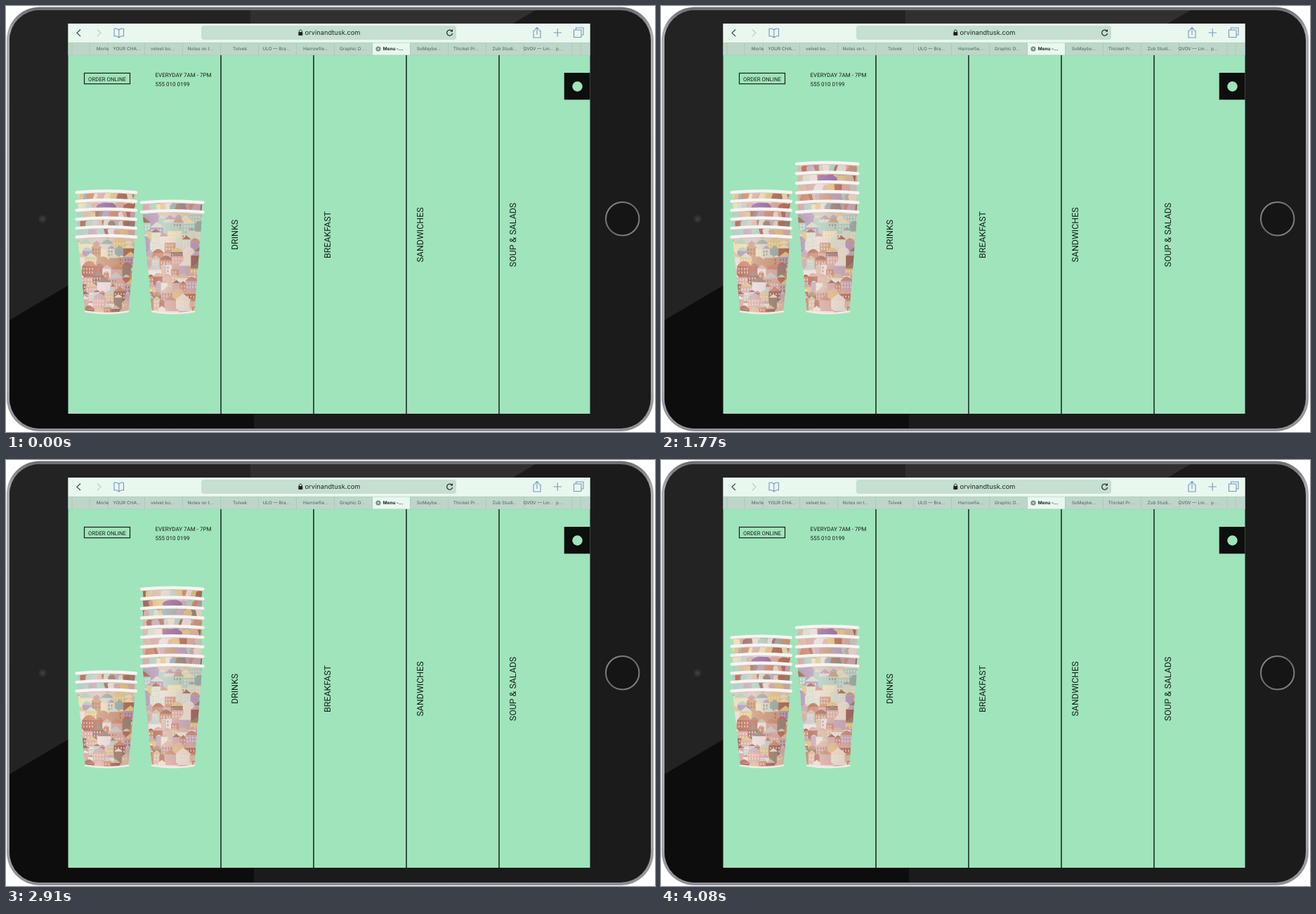
An HTML page for the animation above (4110 ms loop, 924 by 606 pixels).

```html
<!DOCTYPE html>
<html lang="en">
<head>
<meta charset="utf-8">
<title>Cup stacks</title>
<style>
html, body { margin: 0; width: 100%; height: 100%; overflow: hidden; background: #fff; }
svg { display: block; width: 924px; height: 606px; }
text { text-rendering: geometricPrecision; }
.ui { font-family: Inter, "Open Sans", sans-serif; }
.tab { font-size: 6.4px; font-weight: 500; fill: #5f7068; text-anchor: middle; }
.menu { font-family: Roboto, "Liberation Sans", sans-serif; fill: #14201a; }
.icon { fill: none; stroke: #7895bd; stroke-width: 1.1; }
</style>
</head>
<body>
<svg viewBox="0 0 924 606" xmlns="http://www.w3.org/2000/svg">
  <defs>
    <clipPath id="face"><rect x="5" y="6" width="913" height="595" rx="43"/></clipPath>
    <linearGradient id="edge" x2="0" y2="1">
      <stop offset="0" stop-color="#6a6b6e"/><stop offset=".06" stop-color="#a9aaad"/>
      <stop offset=".9" stop-color="#a3a4a8"/><stop offset="1" stop-color="#8d8c92"/>
    </linearGradient>
    <linearGradient id="ring" x2="1" y2="1">
      <stop offset="0" stop-color="#8f9092"/><stop offset=".5" stop-color="#68696b"/><stop offset="1" stop-color="#8a8b8d"/>
    </linearGradient>
    <linearGradient id="shade">
      <stop offset="0" stop-color="#f3e6df" stop-opacity=".12"/><stop offset=".35" stop-color="#f3e6df" stop-opacity=".34"/>
      <stop offset="1" stop-color="#b08878" stop-opacity=".2"/>
    </linearGradient>
  </defs>

  <g id="tablet">
    <rect x="1" y="1.500" width="921" height="603.500" rx="47" fill="url(#edge)"/>
    <g clip-path="url(#face)">
      <rect width="924" height="606" fill="#1b1b1c"/>
      <path d="M0 0H348V244L0 450Z" fill="#232324"/>
      <path d="M348 0H764L348 244Z" fill="#303031"/>
      <path d="M0 450L348 244V580H353V606H0Z" fill="#0d0d0e"/>
    </g>
    <circle cx="52" cy="303" r="5.500" fill="#303032"/>
    <circle cx="52" cy="303" r="2.500" fill="#3d3d42"/>
    <circle cx="877.700" cy="302.800" r="23.700" fill="#151516" stroke="url(#ring)" stroke-width="2"/>
  </g>

  <rect x="88.500" y="25" width="743" height="555" fill="#a0e4bb"/>
  <g id="browser" class="ui">
    <rect x="88.500" y="25" width="743" height="27" fill="#e8f8ef"/>
    <rect x="278" y="28" width="363" height="20" rx="4" fill="#c5dfd0"/>
    <rect x="88.500" y="52" width="743" height="18" fill="#bcd7c8"/>
    <rect x="521.500" y="52" width="54" height="18" fill="#e8f8ef"/>
    <path d="M106 33.500L101 38.300L106 43" class="icon" style="stroke:#46525a;stroke-width:1.3"/>
    <path d="M130 33.500L135 38.300L130 43" class="icon" style="stroke:#b9cbc4"/>
    <path d="M160.800 34Q157 31 154 32.500V43Q158 42 160.800 45Q164 42 167.500 43V32.500Q164 31 160.800 34V45" class="icon"/>
    <path d="M753.500 35H751V45H761V35H758.500M756 41V31M753 33.500L756 30.500L759 33.500" class="icon"/>
    <path d="M779.500 38H791M785.200 32.300V43.700" class="icon"/>
    <path d="M811.500 34V31H822V41H819M808.500 34H819V44.500H808.500Z" class="icon"/>
    <rect x="416.300" y="37" width="6" height="5" rx=".7" fill="#222"/>
    <path d="M417.400 37V35.500Q419.300 32.300 421.200 35.500V37" fill="none" stroke="#222"/>
    <text x="465" y="41.400" font-size="9.300" text-anchor="middle" fill="#1d2922">orvinandtusk.com</text>
    <path d="M634.800 35.600A4 4 0 1 0 635.600 39" fill="none" stroke="#222" stroke-width="1.200"/>
    <path d="M632.500 36.400H636V33Z" fill="#222"/>
    <g id="tabs"></g>
    <circle cx="530" cy="61" r="3.600" fill="#7d8c85"/>
    <path d="M528.600 59.600L531.400 62.400M531.400 59.600L528.600 62.400" stroke="#e8f8ef" stroke-width=".8"/>
  </g>

  <g id="menu" class="menu"></g>
  <g class="menu" font-size="8">
    <rect x="111.500" y="95.500" width="65" height="15.200" fill="none" stroke="#14201a" stroke-width="1.200"/>
    <text x="117" y="106.700" font-size="7.850">ORDER ONLINE</text>
    <text x="212.500" y="101">EVERYDAY 7AM - 7PM</text>
    <text x="212.500" y="114.200">555 010 0199</text>
  </g>
  <rect x="794.700" y="95" width="36.800" height="38.300" fill="#0c0f0d"/>
  <circle cx="813.500" cy="114.500" r="7.200" fill="#a0e4bb"/>
  <g id="stacks"></g>
</svg>
<script>
const LOOP = 4110;
const $ = id => document.getElementById(id);

// Labels with the x of their centre
const tabs = [
  ["Morle", 137.5], ["YOUR CHA...", 172], ["velvet bo...", 223], ["Notes on t...", 277], ["Tolvek", 333],
  ["ULO — Bra...", 385], ["Harrowfie...", 441], ["Graphic D...", 493], ["Menu -...", 551], ["SoMaybe...", 602],
  ["Thicket Pr...", 655], ["Zub Studi...", 710], ["QVOV — Lm...", 758], ["p...", 788]
];
const dividers = [94, 119, 145.5, 806, 818];
for (let x = 197.5; x < 740; x += 54) dividers.push(x);
$("tabs").innerHTML =
  `<path d="${dividers.map(x => `M${x} 53V69`).join("")}" stroke="#a8c6b6" stroke-width=".8"/>` +
  `<path d="M88.500 52.300H831.500M88.500 69.700H831.500" stroke="#aac8b8" stroke-width=".6"/>` +
  tabs.map(([label, x]) => `<text class="tab" x="${x}" y="63.200"${
    label.startsWith("Menu") ? ' style="fill:#16201b;font-weight:700"' : ""}>${label}</text>`).join("");

$("menu").innerHTML = ["DRINKS", "BREAKFAST", "SANDWICHES", "SOUP &amp; SALADS"].map((label, i) => {
  const x = 306 + i * 132;
  return `<path d="M${x} 70V580" stroke="#14201a" stroke-width="1.500"/>
    <text transform="translate(${x + 24} 325.500) rotate(-90)" font-size="12.400" text-anchor="middle">${label}</text>`;
}).join("");

function seeded(seed) {
  return () => {
    seed = (seed * 16807) % 2147483647;
    return seed / 2147483647;
  };
}

const warm = ["#c97f63", "#b0604c", "#dfbd7c", "#eadfd0", "#d9a59b", "#eadfe0", "#bfa3b8", "#94574a", "#d8b59e", "#d3a4a0", "#8d7668", "#c3cbc4"];
const fresh = ["#e2c57e", "#eddfb4", "#a9cfc0", "#d3dccb", "#c9906f", "#b095b8", "#e9ddd6", "#a3604a", "#8fa9a6"];

const chooser = (rnd, list) => () => list[Math.floor(rnd() * list.length)];

function house(rnd, colors, x, y, w, h) {
  const pick = chooser(rnd, colors);
  const roof = rnd() < .6
    ? `M${x} ${y}l${w / 2} ${-w * .4}l${w / 2} ${w * .4}z`
    : `M${x} ${y}q${w / 2} ${-w * .7} ${w} 0z`;
  let art = `<rect x="${x}" y="${y}" width="${w}" height="${h}" fill="${pick()}"/><path d="${roof}" fill="${pick()}"/>`;
  if (rnd() < .5) {
    const pane = rnd() < .7 ? "#f6eee8" : "#71594f";
    for (let px = x + 2.5; px < x + w - 2; px += 4)
      art += `<path d="M${px} ${y + 2.5}v3m0 2v3" stroke="${pane}" stroke-width="1.600" opacity=".7"/>`;
  }
  return art;
}

function town(rnd, left, right, top, bottom) {
  let art = `<rect x="${left}" y="${top}" width="${right - left}" height="${bottom - top}" fill="#dcc5b4"/>`;
  for (let y = top; y < bottom; y += 12) {
    const colors = y < top + (bottom - top) * .28 ? fresh : warm;
    for (let x = left - rnd() * 8; x < right;) {
      const w = 7 + rnd() * 15;
      art += house(rnd, colors, x, y + rnd() * 9, w, 22);
      x += w - 1;
    }
  }
  return art;
}

function band(rnd, left, right, top) {
  const pick = chooser(rnd, [...fresh, ...warm]);
  let art = `<rect x="${left}" y="${top}" width="${right - left}" height="20" fill="${pick()}"/>`;
  for (let x = left; x < right;) {
    const w = 4 + rnd() * 10, lean = rnd() * 12 - 6, drop = rnd() * 7;
    art += `<path d="M${x} ${top + drop}q${w / 2} ${-drop} ${w + 3} 0l${lean} 18h${-w - 3}z" fill="${pick()}"/>`;
    x += w;
  }
  return art;
}

// A slightly arched white lip with a soft lower edge
function rim(left, right, y) {
  const arc = (dy, color, width) =>
    `<path d="M${left + 2.5} ${y + dy}Q${(left + right) / 2} ${y + dy - 4} ${right - 2.5} ${y + dy}"
      fill="none" stroke="${color}" stroke-width="${width}" stroke-linecap="round"/>`;
  return arc(5, "#cfc9c4", 4.4) + arc(4.2, "#f6f5f3", 4.2);
}

function cup({ name, left, right, top, foot }, level, step) {
  const y = top - level * step, id = name + level;
  const rnd = seeded(left * 97 + level * 7919 + 5);
  const [a, b, mid] = [left + 4, right - 3.5, (left + right) / 2];
  const shape = level
    ? `M${a} ${y + 5}Q${mid} ${y + 1} ${b} ${y + 5}L${b - 1.5} ${y + 19}H${a + 1.5}Z`
    : `M${a} ${y + 5}Q${mid} ${y + 1} ${b} ${y + 5}L${foot[1]} 434Q${(foot[0] + foot[1]) / 2} 440 ${foot[0]} 434Z`;
  let art = level ? band(rnd, left, right, y + 3) : town(rnd, left, right, y + 6, 438);
  if (level > 1 && level % 3 === 1)
    art += `<ellipse cx="${mid}" cy="${y + 12}" rx="14" ry="6" fill="#8a55a0"/>`;
  const base = level ? "" : `<path d="M${foot[0]} 434.500Q${(foot[0] + foot[1]) / 2} 440 ${foot[1]} 434.500"
    fill="none" stroke="#f1ece6" stroke-width="2.600" stroke-linecap="round"/>`;
  return `<g id="${id}"><clipPath id="${id}-clip"><path d="${shape}"/></clipPath>
    <g clip-path="url(#${id}-clip)">${art}</g><path d="${shape}" fill="url(#shade)"/>
    ${base}${rim(left, right, y)}</g>`;
}

const stacks = [
  { name: "left", left: 98, right: 187.5, top: 324.5, foot: [113, 174], step: 12.7, max: 6 },
  { name: "right", left: 190.5, right: 283, top: 289, foot: [208, 268], step: 13.7, max: 8 }
];
$("stacks").innerHTML = stacks.map(s => {
  let art = "";
  for (let level = s.max; level >= 0; level--) art += cup(s, level, s.step);
  return art;
}).join("");

// [start in ms, extra cups on the left, extra cups on the right]
const poses = [
  [0, 5, 1], [390, 4, 2], [1020, 4, 3], [1290, 5, 4], [1590, 5, 5],
  [1890, 4, 6], [2160, 3, 7], [2490, 2, 8],
  [3060, 3, 7], [3420, 4, 6], [3810, 5, 5], [4050, 6, 4]
];

function draw(t) {
  const pose = poses.findLast(([start]) => start <= t);
  stacks.forEach((s, i) => {
    for (let level = 1; level <= s.max; level++)
      $(s.name + level).style.display = level <= pose[i + 1] ? "" : "none";
  });
}

const begin = performance.now();
function tick() {
  draw((performance.now() - begin) % LOOP);
  requestAnimationFrame(tick);
}
tick();
</script>
</body>
</html>
```
